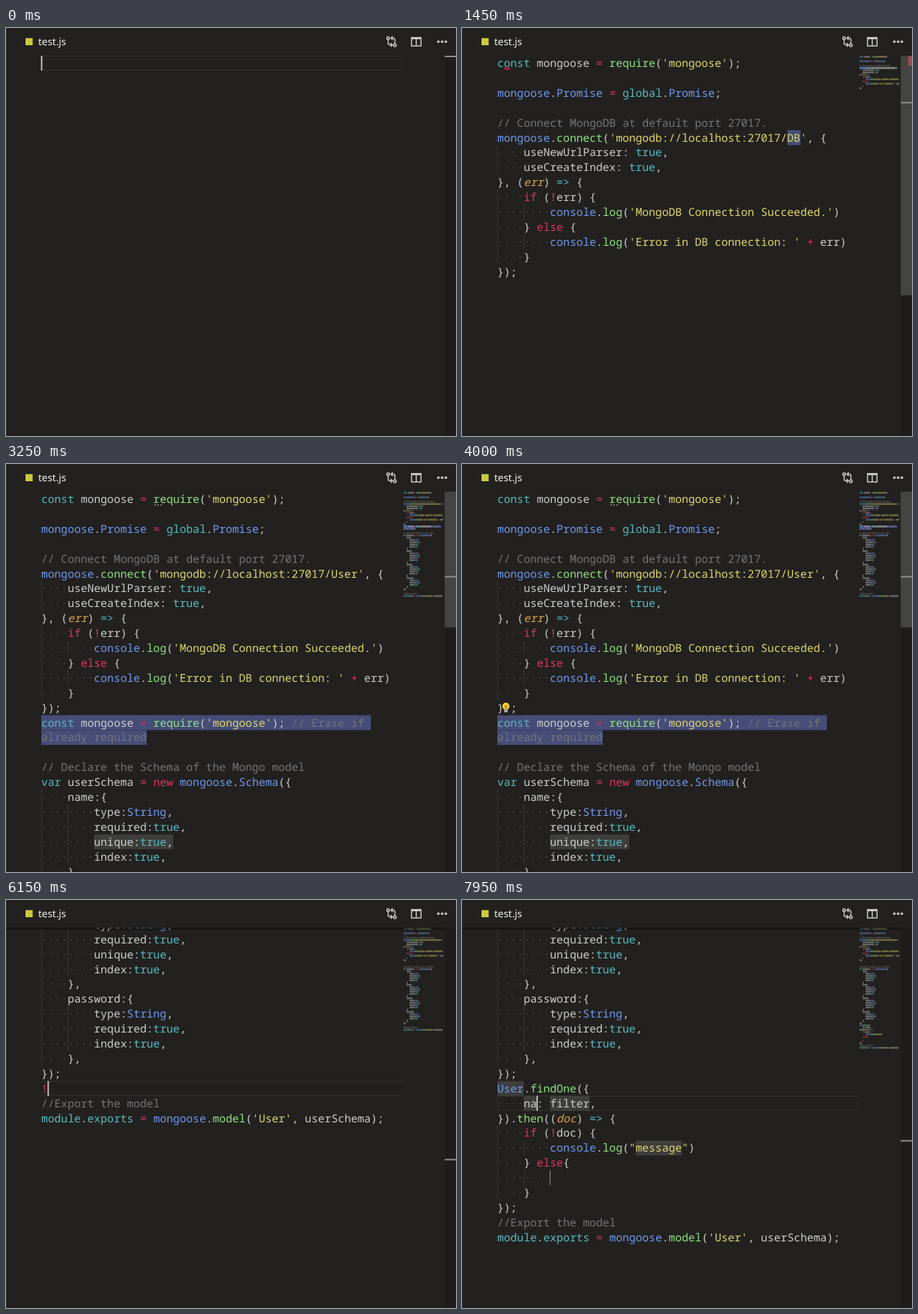
An HTML page that plays this animation: 600x545 px, repeating every 8 s.

```html
<!DOCTYPE html>
<html lang="en">
<head>
<meta charset="utf-8">
<title>Snippets in the editor</title>
<style>
  html, body { margin: 0; width: 100%; height: 100%; overflow: hidden; background: #222120; }
  svg { display: block; width: 600px; height: 545px; }
  text { font: 14.65px "Noto Sans Mono", "DejaVu Sans Mono", monospace; fill: #cdcdcd; text-rendering: geometricPrecision; white-space: pre; }
  .title { font: 13.4px "Noto Sans", "Open Sans", sans-serif; fill: #f4f4f4; }
  .comment { fill: #757577; }
  .string { fill: #e0d66a; }
  .param { fill: #d9a441; font-style: italic; }
  .type { fill: #58bbc0; }
  .key { fill: #e0355f; }
  .name { fill: #7199ee; }
  .call { fill: #8fe37f; }
  .dots { fill: #434343; }
  .match { fill: #4a66f5; font-weight: 700; }
  .line { fill: none; stroke: #c5c5c5; stroke-width: 1.5; }
</style>
</head>
<body>
<svg viewBox="0 0 600 545" xmlns="http://www.w3.org/2000/svg">
  <defs>
    <clipPath id="pane"><rect y="37" width="600" height="508"/></clipPath>
    <linearGradient id="shade" x2="0" y2="1">
      <stop stop-color="#000" stop-opacity=".55"/><stop offset="1" stop-color="#000" stop-opacity="0"/>
    </linearGradient>
  </defs>
  <rect width="600" height="545" fill="#222120"/>
  <rect width="1" height="545" fill="#303030"/>
  <rect x="26" y="13.5" width="9.5" height="9.5" fill="#cbcb41"/>
  <text class="title" x="43" y="22.5">test.js</text>
  <g class="line">
    <circle cx="509.5" cy="13.5" r="1.8"/>
    <path d="M509.5 15.5V20q0 2.5 2.5 2.5h2.5M512.8 20l2.4 2.5-2.4 2.5"/>
    <circle cx="518.5" cy="23" r="1.8"/>
    <path d="M518.5 21V16q0-2.5-2.5-2.5h-2.5M515.7 11l-2.4 2.5 2.4 2.5"/>
    <path d="M540.7 13V24H553.3V13M547 13V24"/>
    <path d="M540 13.5H554" stroke-width="3"/>
  </g>
  <g fill="#c5c5c5">
    <circle cx="576.5" cy="18.3" r="1.8"/><circle cx="581.5" cy="18.3" r="1.8"/><circle cx="586.5" cy="18.3" r="1.8"/>
  </g>
  <g id="editor" clip-path="url(#pane)"></g>
</svg>
<script>
const LOOP = 8000, LH = 19.9, CW = 8.79, LEFT = 47, TOP = 37, VIEW = 508;
const BOTTOM = 651; // scroll offset after moving to the end of the file
const editor = document.getElementById('editor');

const COLORS = {
  comment: '#757577', string: '#e0d66a', param: '#d9a441', type: '#58bbc0',
  key: '#e0355f', name: '#7199ee', call: '#8fe37f', '': '#cdcdcd'
};
const KINDS = ['comment', 'string', 'param', 'type', 'key', 'name', 'call'];
const SYNTAX = new RegExp([
  /(\/\/.*|^already required)/,
  /('[^']*'?|"[^"]*"?)/,
  /((?<=\()(?:err|doc|res)(?=\) (?:=>|\{)))/,
  /(=>|\b(?:const|var|function|true|global|module|exports)\b)/,
  /(\b(?:if|else|new)\b|[=+!])/,
  /(^\w+(?=\.findOne)|\b(?:mongoose(?=\.)|String|Promise|Model|console|Schema)\b)/,
  /(\w+(?=\())/
].map(r => r.source).join('|'), 'g');

// Text of the file

const connect = db => [
  "const mongoose = require('mongoose');",
  "",
  "mongoose.Promise = global.Promise;",
  "",
  "// Connect MongoDB at default port 27017.",
  `mongoose.connect('mongodb://localhost:27017/${db}', {`,
  "    useNewUrlParser: true,",
  "    useCreateIndex: true,",
  "}, (err) => {",
  "    if (!err) {",
  "        console.log('MongoDB Connection Succeeded.')",
  "    } else {",
  "        console.log('Error in DB connection: ' + err)",
  "    }",
  "});"
];
const field = (name, ...flags) => [
  `    ${name}:{`, "        type:String,", ...flags.map(f => `        ${f}:true,`), "    },"
];
const REQUIRE = ["const mongoose = require('mongoose'); // Erase if ", "already required"];
const SCHEMA = [
  "",
  "// Declare the Schema of the Mongo model",
  "var userSchema = new mongoose.Schema({",
  ...['name', 'email', 'mobile'].flatMap(n => field(n, 'required', 'unique', 'index')),
  ...field('password', 'required', 'index'),
  "});"
];
const EXPORT = ["//Export the model", "module.exports = mongoose.model('User', userSchema);"];
const findOne = (model, key) => [
  `${model}.findOne({`,
  `    ${key}: filter,`,
  "}).then((doc) => {",
  "    if (!doc) {",
  '        console.log("message")',
  "    } else{",
  "        ",
  "    }",
  "});"
];

// Suggestions

const SNIPPETS = 'a bw c cc cd cr dm do f fbi fo foad foau gm gum i rm s u um'
  .split(' ').map(s => '!mdb' + s);
const about = (verb, code, rest = ['in mongoose. (Mongo Snippets', 'de-js)']) =>
  ({ intro: ['Generates code for ' + verb, ...rest], code });
const DOCS = {
  a: about('aggregation', [
    "Model.aggregate([", "    { group: { _id: null,", "max: 'value'}}}",
    "    { project: { _id: 0 }}", "]).", "  then(function (res) {", "    console.log(res)"
  ]),
  c: about('connecting', connect('DB').slice(0, 12)),
  f: about('find', [
    "Model.find({", "    field: filter,", "}).then((docs) => {", "    console.log(docs)", "});"
  ]),
  fo: about('findOne in', findOne('Model', 'field').slice(0, 8), ['mongoose. (Mongo Snippets', 'js)']),
  gm: about('a model', [...REQUIRE, ...SCHEMA.slice(0, 6)]),
  gum: about('user model', [...REQUIRE, ...SCHEMA.slice(0, 6)])
};

// Drawing helpers

const esc = s => s.replace(/&/g, '&amp;').replace(/</g, '&lt;');
const span = (s, cls) => `<tspan class="${cls}">${esc(s)}</tspan>`;
const text = (x, y, inner) => `<text x="${x}" y="${y.toFixed(2)}" xml:space="preserve">${inner}</text>`;
const rect = (x, y, w, h, fill, more = '') =>
  `<rect x="${x}" y="${y.toFixed(2)}" width="${w}" height="${h}" fill="${fill}" ${more}/>`;
const path = (d, stroke, width = 1) => `<path d="${d}" fill="none" stroke="${stroke}" stroke-width="${width}"/>`;

function tokens(line) {
  const out = [];
  let at = 0;
  for (const m of line.matchAll(SYNTAX)) {
    if (m.index > at) out.push([line.slice(at, m.index), '']);
    out.push([m[0], KINDS[m.slice(1).findIndex(g => g !== undefined)]]);
    at = m.index + m[0].length;
  }
  if (at < line.length) out.push([line.slice(at), '']);
  return out;
}
const colored = line => tokens(line).map(([s, c]) => span(s, c)).join('');
const indentOf = line => line.match(/^ */)[0].length;

function codeLine(line, y) {
  const n = indentOf(line);
  let out = '';
  for (let c = 0; c < n; c += 4) out += rect(LEFT + c * CW, y, 1, LH, '#383838');
  const dots = n ? span('·'.repeat(n), 'dots') : '';
  return out + text(LEFT, y + 15, dots + colored(line.slice(n)));
}

function minimap(s) {
  let out = '';
  s.rows.forEach((line, r) => {
    const y = TOP + 0.5 + r * 3;
    if (s.sel.some(k => k[0] === r)) out += rect(530, y - 0.5, line.length, 3, '#464d78');
    let x = 530;
    for (const [str, cls] of tokens(line)) {
      for (const m of str.matchAll(/\S+/g)) {
        const left = x + m.index, w = Math.min(m[0].length, 583 - left);
        if (w > 0) out += rect(left, y, w, 1.9, COLORS[cls], 'opacity=".48"');
      }
      x += str.length;
    }
  });
  return out;
}

function ruler(s) {
  const height = (s.rows.length - 1) * LH + VIEW, k = VIEW / height;
  let out = rect(585, TOP, 15, VIEW, '#1e1d1c');
  if (s.error) out += rect(595, TOP + 1, 5, LH * k, '#c32a36');
  if (s.slider > 0) out += rect(585, TOP + s.scroll * k, 15, VIEW * k, '#797979', `opacity="${0.42 * s.slider}"`);
  return out + rect(585, Math.max(TOP, TOP - 1 + s.cur[0] * LH * k), 15, 2, '#8c8c8a');
}

const snippetIcon = y =>
  path(`M81 ${y + 14.5}V${y + 4.7}H92.5V${y + 14.5}`, '#c5c5c5', 1.6) +
  `<path d="M80.5 ${y + 15.5}H93.5" stroke="#c5c5c5" stroke-width="1.6" stroke-dasharray="1.8 1.8"/>`;

function popup(p, y) {
  const all = SNIPPETS.filter(n => n.startsWith(p.typed)), items = all.slice(0, 12);
  const doc = DOCS[items[0].slice(4)];
  const listH = items.length * LH, docH = items[0] === '!mdbc' ? LH * 16 : LH * 12;
  const top = p.above ? y - listH : y + LH, docTop = p.above ? y - docH : y + LH;
  const edge = 'stroke="#474749"';

  let out = rect(72, top, 346, listH, '#252526', edge) + rect(72.5, top + 0.5, 345, LH, '#162a4e');
  items.forEach((n, i) => {
    const rowY = top + i * LH, k = p.typed.length;
    out += snippetIcon(rowY) + text(99, rowY + 15, span(n.slice(0, k), 'match') + span(n.slice(k), ''));
  });
  if (all.length > 12) out += rect(407, top, 11, listH * 12 / all.length, '#4d4d4d');

  out += rect(418, docTop, 190, docH, '#252526', edge);
  const base = docTop + 19.5;
  doc.intro.forEach((l, i) => out += text(424, base + i * LH, span(l, 'comment')));
  doc.code.forEach((l, i) => {
    const lineY = base + (doc.intro.length + i) * LH + 16;
    if (lineY < docTop + docH) out += text(424, lineY, colored(l));
  });
  return out;
}

const bulb = y =>
  rect(53, y, 12, LH, '#222120') +
  `<circle cx="58.5" cy="${y + 8}" r="4.8" fill="#f4d02c"/>` +
  path(`M56.5 ${y + 7}l2 2 2-2M58.5 ${y + 9}v4`, '#5a4a10') +
  rect(56.3, y + 12.5, 4.5, 3.5, '#b9b9b9');

// Timeline

const clamp = v => Math.max(0, Math.min(1, v));
const ease = v => v * v * (3 - 2 * v);
const typed = (word, t, start, step) =>
  word.slice(0, Math.max(0, Math.floor((t - start) / step) + 1));

function suggest(word, t, start, step, above) {
  const seen = typed(word, t - 50, start, step);
  return seen.length > 1 ? { typed: seen, above } : null;
}

function stateAt(t) {
  const s = {
    rows: [], sel: [], marks: [], cur: [0, 0], popup: null, stop: null,
    scroll: BOTTOM * ease(clamp((t - 4650) / 400)),
    slider: t < 1400 ? 0 : 1 - clamp((t - 5400) / 200),
    error: t >= 750 && t < 2400,
    hint: t >= 2500, bulb: t >= 3600 && t < 4300
  };

  if (t < 1400) {
    const word = typed('!mdbc', t, 550, 112);
    s.rows = [word];
    s.cur = [0, word.length];
    s.popup = suggest('!mdbc', t, 550, 112, false);
  } else if (t < 3100) {
    const db = typed('User', t, 1600, 90) || 'DB';
    const word = typed('!mdbgum', t, 2250, 100);
    s.rows = [...connect(db), word];
    const col = s.rows[5].indexOf(db + "'");
    if (t < 2050) {
      (t < 1600 ? s.sel : s.marks).push([5, col, db.length]);
      s.cur = [5, col + db.length];
    } else {
      s.cur = [15, word.length];
    }
    s.popup = suggest('!mdbgum', t, 2250, 100, true);
  } else if (t < 4300) {
    s.rows = [...connect('User'), ...REQUIRE, ...SCHEMA, '', ...EXPORT];
    s.sel = REQUIRE.map((l, i) => [15 + i, 0, l.length]);
    s.marks = [[23, 8, 12]];
    s.cur = [16, REQUIRE[1].length];
  } else {
    const head = [...connect('User'), '', ...SCHEMA];
    if (t < 6900) {
      const word = typed('!mdbfo', t, 6150, 120);
      s.rows = [...head, word, ...EXPORT];
      s.cur = t < 5050 ? [15, 0] : [43, word.length];
      s.popup = suggest('!mdbfo', t, 6150, 120, false);
      if (t < 5050) s.marks = [[22, 8, 12]];
    } else {
      const model = typed('User', t, 7200, 110) || 'Model';
      const key = typed('na', t, 7850, 50) || 'field';
      s.rows = [...head, ...findOne(model, key), ...EXPORT];
      s.marks = [[43, 0, model.length], [44, 4, key.length], [44, 6 + key.length, 6], [47, 21, 7]];
      s.stop = [49, 8];
      if (t < 7650) {
        s.cur = [43, model.length];
        if (t < 7200) s.sel = [[43, 0, 5]];
      } else {
        s.cur = [44, 4 + key.length];
        if (t < 7850) s.sel = [[44, 4, 5]];
      }
    }
  }
  return s;
}

function draw(s) {
  const rowY = r => TOP + r * LH - s.scroll;
  const [row, col] = s.cur, y = rowY(row);
  const box = fill => ([r, c, n]) => rect(LEFT + c * CW, rowY(r), n * CW, LH, fill);
  let out = '';

  if (!s.sel.length) out += path(`M${LEFT} ${y + 0.5}H530M${LEFT} ${y + LH - 0.5}H530`, '#2e2e2d', 1.6);
  out += s.marks.map(box('#3e3e3d')).join('') + s.sel.map(box('#464d78')).join('');
  s.rows.forEach((line, r) => {
    const top = rowY(r);
    if (top > TOP - LH && top < 545) out += codeLine(line, top);
  });
  if (s.error) out += path('M56 55l2-2 2 3 2-3 2 3', '#e0303c', 1.2);
  if (s.hint && s.scroll < LH) {
    out += [198, 202, 206].map(x => rect(x, rowY(0) + 17, 1.6, 1.6, '#a5a5a5')).join('');
  }
  if (s.stop) out += rect(LEFT + s.stop[1] * CW - 0.5, rowY(s.stop[0]), 1.3, LH, '#7a7a7a');
  if (!s.sel.length) out += rect(LEFT + col * CW - 0.4, y, 1.8, LH, '#c8c8c4');
  if (s.bulb) out += bulb(rowY(14));
  out += minimap(s) + ruler(s);
  if (s.scroll > 0) out += rect(0, TOP, 585, 4, 'url(#shade)');
  if (s.popup) out += popup(s.popup, y);
  return out;
}

let shown = '';
function frame(now) {
  const markup = draw(stateAt(now % LOOP));
  if (markup !== shown) editor.innerHTML = shown = markup;
  requestAnimationFrame(frame);
}
frame(0);
</script>
</body>
</html>
```
